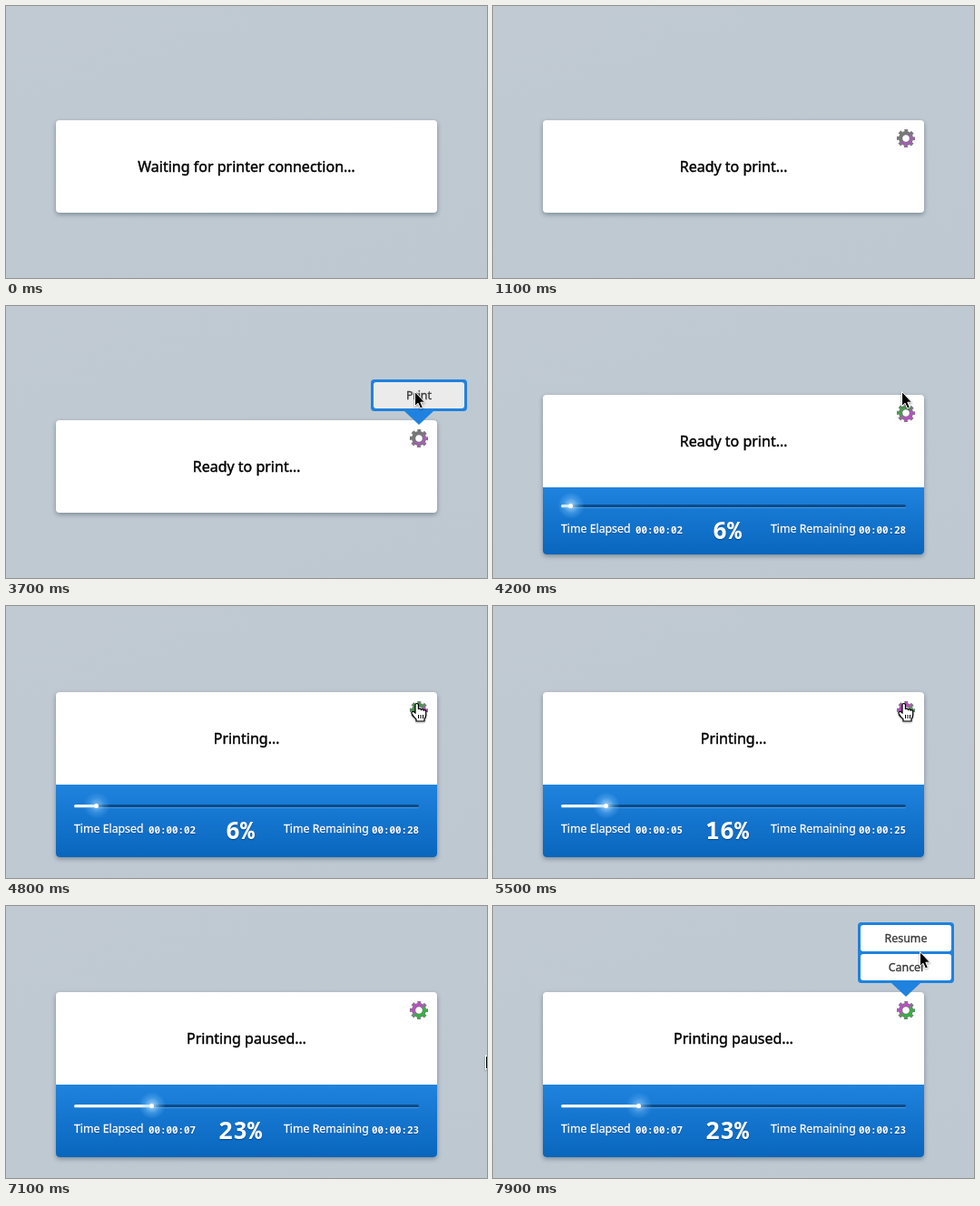
These frames come from a looping animation (530 by 300 pixels, 8000 ms). An HTML page:

```html
<!DOCTYPE html>
<html lang="en">
<head>
<meta charset="utf-8">
<title>Print status</title>
<style>
html, body { margin: 0; width: 100%; height: 100%; overflow: hidden; }
body { position: relative; background: linear-gradient(160deg, #c1cad3, #bdc8d1); font-family: "Noto Sans", sans-serif; }
body * { box-sizing: border-box; }
svg { position: absolute; overflow: visible; }

.card, .panel, .msg, .gear, .menu, .item, .fill, .glow, .cursor, .arrow, .hand, stop {
  animation: 8s step-end infinite;
}

.card {
  position: absolute; left: 55px; width: 420px; border-radius: 4px; background: #fff;
  box-shadow: 0 2px 5px rgba(30, 50, 65, .42);
  animation-name: rise; animation-timing-function: ease-out;
}
.msg {
  height: 102px; line-height: 102px; text-align: center; font-size: 16px; color: #000;
  -webkit-text-stroke: .4px #000;
}
.panel {
  position: relative; overflow: hidden; border-radius: 0 0 4px 4px;
  background: linear-gradient(#1f83de, #0966bd);
  animation-name: unfold; animation-timing-function: ease-out;
}
.info { position: absolute; top: 50%; left: 0; width: 100%; height: 80px; margin-top: -40px; color: #fff; }
.info span {
  position: absolute; top: 39px; line-height: 20px; white-space: nowrap; font-size: 12.3px;
  -webkit-text-stroke: .3px #fff; text-shadow: 0 1px 1px rgba(0, 30, 80, .5);
}
.info .time { font: bold 10.83px/20px "Noto Sans Mono", monospace; top: 40px; -webkit-text-stroke: 0; }
.info .pct {
  left: 153px; width: 100px; top: 35px; text-align: center; -webkit-text-stroke: 0;
  font: bold 26.7px/30px "Noto Sans Mono", monospace;
}
.track {
  position: absolute; left: 20px; top: 22px; width: 380px; height: 3px; border-radius: 2px;
  background: #0c4b88; box-shadow: 0 1px rgba(255, 255, 255, .22);
}
.fill {
  height: 3px; border-radius: 2px; background: #fff; position: relative;
  animation-name: fill; animation-timing-function: ease;
}
.fill::after {
  content: ""; position: absolute; right: -2px; top: -1px; width: 5px; height: 5px;
  border-radius: 50%; background: #fff;
}
.glow {
  position: absolute; right: -15px; top: -14px; width: 30px; height: 30px; border-radius: 50%;
  background: radial-gradient(rgba(190, 230, 255, .85), rgba(130, 200, 255, .35) 40%, transparent 70%);
  animation: pulse .8s ease-in-out infinite alternate;
}

.gear { left: 400px; top: 20px; animation-name: gear; }
.a { animation-name: tintA; }
.b { animation-name: tintB; }

.menu {
  position: absolute; left: 347px; bottom: calc(100% + 10px); width: 106px; padding: 3px;
  border-radius: 4px; background: #1f82de; animation-name: menu;
}
.menu::after {
  content: ""; position: absolute; left: 37px; top: 100%;
  border: solid transparent; border-width: 15px 16px 0; border-top-color: #1f82de;
}
.item {
  height: 29px; line-height: 29px; border-radius: 3px; background: #fff; color: #3c3c3c;
  text-align: center; font-size: 12.4px; -webkit-text-stroke: .35px #3c3c3c;
}
.item + .item { margin-top: 3px; }
.first { animation-name: hoverFirst; }
.second { animation-name: hoverSecond; }

.cursor {
  position: absolute; left: 0; top: 0;
  animation-name: travel; animation-timing-function: linear;
  filter: drop-shadow(0 1px 1px rgba(0, 0, 0, .35));
}
.arrow { animation-name: arrow; }
.hand { animation-name: hand; }

@keyframes rise {
  0% { top: 126px; animation-timing-function: step-end; }
  52.4% { top: 98px; }
  54%, 100% { top: 95px; }
}
@keyframes unfold {
  0% { height: 0; animation-timing-function: step-end; }
  52.4% { height: 74px; }
  54%, 100% { height: 80px; }
}
@keyframes fill {
  0%, 52.4% { width: 10.5px; }
  57.5%, 60% { width: 24.5px; }
  64.4% { width: 36.8px; }
  68.4% { width: 49px; }
  73.4%, 73.7% { width: 61.3px; }
  79.1% { width: 73.5px; }
  84.4%, 100% { width: 85.8px; }
}
@keyframes pulse { from { opacity: .7; } to { opacity: 1; } }
@keyframes gear { 0% { visibility: hidden; } 13.65%, 100% { visibility: visible; } }
@keyframes tintA {
  0% { stop-color: #787878; }
  52.4% { stop-color: #43a04b; }
  66%, 100% { stop-color: #bb4fc6; }
}
@keyframes tintB {
  0% { stop-color: #a45fb4; }
  52.4% { stop-color: #bb4cc6; }
  66%, 100% { stop-color: #2db63c; }
}
@keyframes menu {
  0%, 48.6%, 81.1% { visibility: hidden; }
  42.4%, 71.1%, 94.9%, 100% { visibility: visible; }
}
@keyframes hoverFirst {
  0%, 48.6%, 81.1%, 100% { background: #fff; }
  45.6%, 77.4% { background: #ebebeb; }
}
@keyframes hoverSecond {
  0%, 77.4% { background: #fff; }
  73.6%, 97.3%, 100% { background: #ebebeb; }
}
@keyframes travel {
  0%, 36% { translate: 468px 267px; }
  37.5% { translate: 458px 225px; }
  38.75% { translate: 440px 172px; }
  40%, 42.75% { translate: 453px 144px; }
  43.75% { translate: 452px 120px; }
  45% { translate: 450px 100px; }
  46.25%, 53.5% { translate: 450px 94px; }
  56.5% { translate: 453px 100px; }
  60%, 70.8% { translate: 453px 107px; }
  72.5% { translate: 454px 85px; }
  75% { translate: 455px 60px; }
  76.25%, 81.25% { translate: 455px 46px; }
  85% { translate: 490px 95px; }
  87.5% { translate: 518px 148px; }
  88.75%, 89.9% { translate: 528px 164px; }
  91% { translate: 502px 140px; }
  92.5%, 95% { translate: 453px 107px; }
  96.25% { translate: 462px 78px; }
  97.5% { translate: 467px 62px; }
  98.7%, 100% { translate: 470px 50px; }
}
@keyframes arrow {
  0%, 39.7%, 57.5%, 92% { visibility: hidden; }
  33.65%, 42.8%, 71%, 95.2%, 100% { visibility: visible; }
}
@keyframes hand {
  0%, 42.8%, 71%, 95.2%, 100% { visibility: hidden; }
  39.7%, 57.5%, 92% { visibility: visible; }
}
</style>
</head>
<body>
<div class="card">
  <div class="msg">Waiting for printer connection…</div>
  <div class="panel">
    <div class="info">
      <div class="track"><div class="fill"><div class="glow"></div></div></div>
      <span style="left:20px">Time Elapsed</span>
      <span class="time elapsed" style="left:102px">00:00:02</span>
      <span class="pct">6%</span>
      <span style="left:251px">Time Remaining</span>
      <span class="time remaining" style="right:20px">00:00:28</span>
    </div>
  </div>
  <svg class="gear" width="1" height="1">
    <defs>
      <linearGradient id="tint" gradientUnits="userSpaceOnUse" x1="-6" y1="-7" x2="5" y2="7">
        <stop class="a" offset=".4"/><stop class="b" offset=".65"/>
      </linearGradient>
    </defs>
    <g fill="none">
      <circle r="8.4" stroke="#777" stroke-width="3.4" stroke-dasharray="3.7 2.9" stroke-dashoffset="1.85"/>
      <circle r="5.9" stroke="#777" stroke-width="4.2"/>
      <circle r="8.2" stroke="url(#tint)" stroke-width="2.4" stroke-dasharray="2.4 4.04" stroke-dashoffset="1.2"/>
      <circle r="5.9" stroke="url(#tint)" stroke-width="2.6"/>
    </g>
  </svg>
  <div class="menu">
    <div class="item first">Print</div>
    <div class="item second" hidden>Cancel</div>
  </div>
</div>
<div class="cursor">
  <svg class="arrow" width="1" height="1">
    <path d="M.5.5V16.5L4 13.2 6.6 19 9.3 17.8 6.8 12.2H11.6Z" fill="#000" stroke="#fff"/>
  </svg>
  <svg class="hand" width="1" height="1">
    <path d="M-2 11V2.2a1.7 1.7 0 0 1 3.4 0V7a1.6 1.6 0 0 1 3 .4 1.6 1.6 0 0 1 2.8.7 1.5 1.5 0 0 1 2.5 1.2V13q0 3-1.7 4.500V20H-1V18Q-4 15-6 11.500A1.600 1.600 0 0 1-3.400 9.800Z" fill="#fff" stroke="#000" stroke-width="1.2"/>
    <path d="M1.500 13v4M4 13v4M6.500 13v4" stroke="#000"/>
  </svg>
</div>
<script>
const $ = s => document.querySelector(s);
const clock = $('.card').getAnimations()[0];
const ticks = [4800, 5150, 5470, 5890, 6340];
const put = (s, text) => { const el = $(s); if (el.textContent !== text) el.textContent = text; };
const time = s => '00:00:' + String(s).padStart(2, '0');

function draw() {
  const t = (clock.currentTime || 0) % 8000;
  const secs = 2 + ticks.filter(x => t >= x).length;
  put('.msg', t < 590 ? 'Waiting for printer connection…' : t < 4190 ? 'Ready to print…'
    : t < 6490 ? 'Printing…' : 'Printing paused…');
  put('.elapsed', time(secs));
  put('.remaining', time(30 - secs));
  put('.pct', Math.round(secs / 31 * 100) + '%');
  put('.first', t < 4190 ? 'Print' : t < 6490 ? 'Pause' : 'Resume');
  $('.second').hidden = t < 4190;
  requestAnimationFrame(draw);
}
draw();
</script>
</body>
</html>
```
